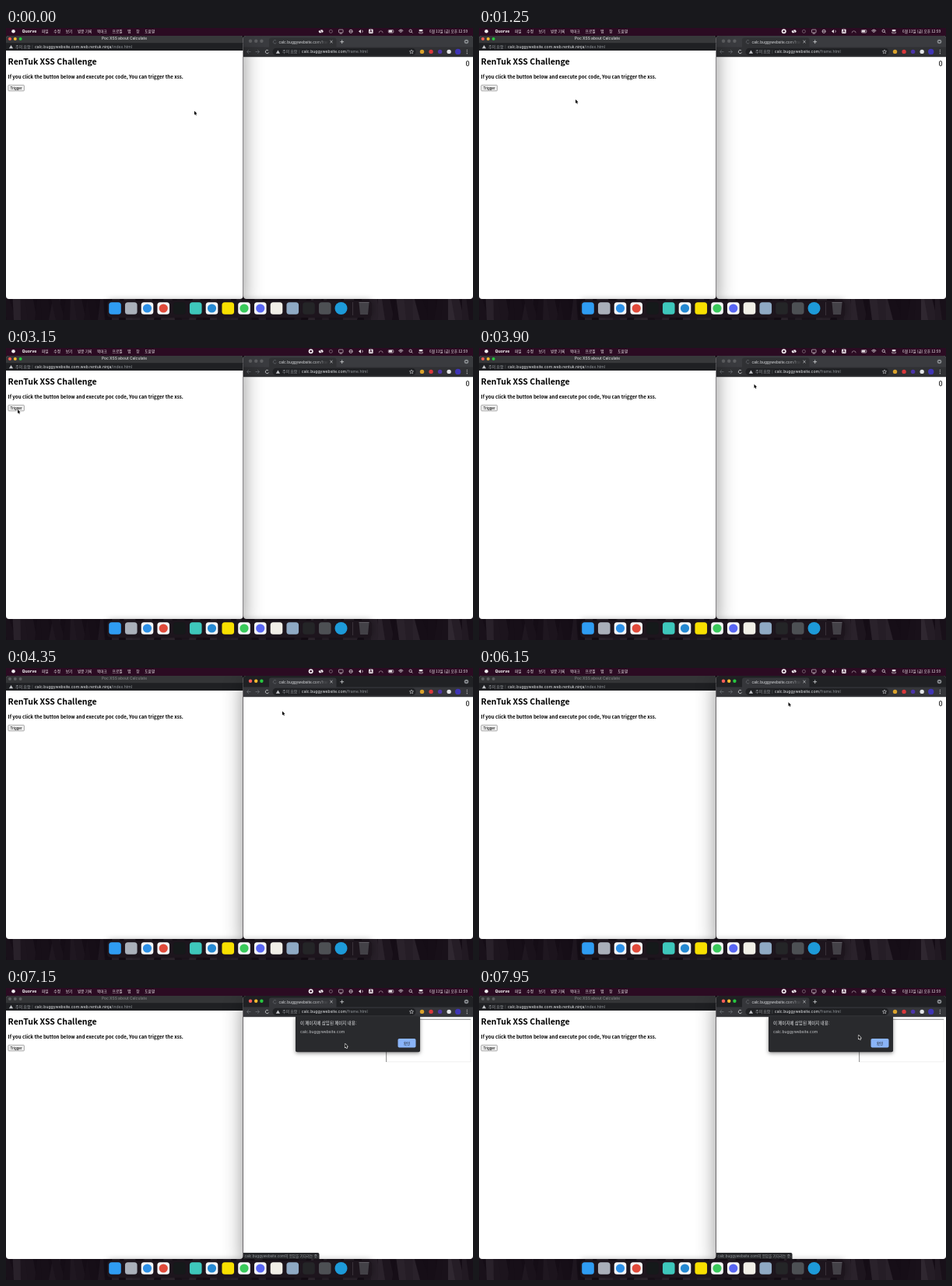
An HTML page with a canvas for the animation above (8000 ms loop, 600 px wide and 375 px high).

```html
<!DOCTYPE html>
<html lang="ko">
<head>
<meta charset="utf-8">
<title>XSS demo</title>
<style>
html, body { margin: 0; width: 100%; height: 100%; overflow: hidden; background: #120a12; }
canvas { display: block; width: 600px; height: 375px; }
</style>
</head>
<body>
<canvas id="stage" width="600" height="375"></canvas>
<script>
const LOOP = 8000, STEP = 50, TAU = Math.PI * 2;
const W = 600, H = 375, SPLIT = 304.5, TOP = 10, FLOOR = 348;
const CJK = '"Noto Sans CJK KR", "Noto Sans CJK JP", "Noto Sans CJK", sans-serif';
const UI = 'Inter, ' + CJK;
const PALE = '#eee7ec', GREY = '#d4d6d9', DIM = '#696c71', BAR = '#2b0b22';
const ctx = document.getElementById('stage').getContext('2d');

// Pointer moves after the first position
const HOME = { x: 242, y: 106.5 };
const MOVES = [
  { from: 600, to: 1350, x: 118, y: 91 },
  { from: 1500, to: 2300, x: 24, y: 75 },
  { from: 2350, to: 2850, x: 15, y: 79 },
  { from: 3350, to: 3900, x: 353.5, y: 46.5 },
  { from: 3900, to: 4200, x: 355, y: 55.5 },
  { from: 4600, to: 4950, x: 397.5, y: 44 },
  { from: 6900, to: 7150, x: 435.5, y: 71.5 },
  { from: 7150, to: 7750, x: 453, y: 69 },
  { from: 7750, to: 7950, x: 487.5, y: 60.5 }
];

function rect(x, y, w, h, fill) {
  ctx.fillStyle = fill;
  ctx.fillRect(x, y, w, h);
}

function box(x, y, w, h, r, fill, stroke) {
  ctx.beginPath();
  ctx.roundRect(x, y, w, h, r);
  if (fill) { ctx.fillStyle = fill; ctx.fill(); }
  if (stroke) { ctx.strokeStyle = stroke; ctx.lineWidth = 0.6; ctx.stroke(); }
}

function dot(x, y, r, fill) {
  ctx.beginPath();
  ctx.arc(x, y, r, 0, TAU);
  ctx.fillStyle = fill;
  ctx.fill();
}

function ring(x, y, r, color, from = 0, to = TAU, width = 0.7) {
  ctx.beginPath();
  ctx.arc(x, y, r, from, to);
  ctx.strokeStyle = color;
  ctx.lineWidth = width;
  ctx.stroke();
}

function line(color, width, ...p) {
  ctx.beginPath();
  for (let i = 0; i < p.length; i += 2) ctx.lineTo(p[i], p[i + 1]);
  ctx.strokeStyle = color;
  ctx.lineWidth = width;
  ctx.stroke();
}

function shape(fill, ...p) {
  ctx.beginPath();
  for (let i = 0; i < p.length; i += 2) ctx.lineTo(p[i], p[i + 1]);
  ctx.closePath();
  ctx.fillStyle = fill;
  ctx.fill();
}

// Returns the right end of the text
function text(s, x, y, size, fill, weight = 400, font = UI, align = 'left') {
  ctx.font = `${weight} ${size}px ${font}`;
  ctx.textAlign = align;
  ctx.fillStyle = fill;
  ctx.fillText(s, x, y);
  return x + ctx.measureText(s).width;
}

function fade(x0, y0, x1, y1, ...colors) {
  const g = ctx.createLinearGradient(x0, y0, x1, y1);
  colors.forEach((c, i) => g.addColorStop(i / (colors.length - 1), c));
  return g;
}

function at(x, y, paint) {
  ctx.save();
  ctx.translate(x, y);
  paint();
  ctx.restore();
}

function shadow(alpha, blur, dy, paint) {
  ctx.save();
  ctx.shadowColor = `rgba(0,0,0,${alpha})`;
  ctx.shadowBlur = blur;
  ctx.shadowOffsetY = dy;
  paint();
  ctx.restore();
}

function seeded(n) {
  return () => (n = (n * 16807) % 2147483647) / 2147483647;
}

function wallpaper() {
  rect(0, 0, W, H, '#150d16');
  const rnd = seeded(11);
  for (let x = -8; x < W; x += 9) {
    const tone = 14 + 26 * rnd() ** 2, lean = 16 * rnd() - 8;
    shape(`rgb(${tone + 8},${tone},${tone + 9})`,
      x, H, x + lean, FLOOR - 2, x + lean + 10, FLOOR - 2, x + 12, H);
  }
}

// Each glyph is painted around its own centre
const STATUS = [
  () => { dot(0, 0, 3, PALE); dot(0, 0, 1.2, BAR); },
  () => { dot(-1, 0.3, 1.8, PALE); dot(1, 0, 2, PALE); line(BAR, 0.8, -2, -2, 3, 3); },
  () => ring(0, 0, 2, '#8d7c88'),
  () => { box(-2.8, -2.2, 5.6, 3.8, 0.6, null, PALE); line(PALE, 0.7, -1.5, 2.8, 1.5, 2.8); },
  () => { ring(0, 0, 2.1, PALE); line(PALE, 0.6, -2, 0, 2, 0); },
  () => { shape(PALE, -3, 0, 0, -2.4, 0, 2.4); ring(0.3, 0, 2, PALE, -0.9, 0.9); },
  () => { box(-2.8, -2.8, 5.6, 5.6, 1, PALE); text('A', 0, 1.8, 4.8, BAR, 600, UI, 'center'); },
  () => ring(0, 2, 2.5, '#a898a3', TAU / 2, TAU),
  () => { box(-3.2, -1.8, 6.5, 3.6, 1, null, PALE); rect(-2.5, -1.2, 4.2, 2.4, PALE); },
  () => { for (let r = 1.2; r < 5; r += 1.5) ring(0, 2.2, r, PALE, -2.35, -0.8, 0.8); },
  () => { ring(-0.5, -0.5, 1.7, PALE); line(PALE, 0.7, 0.7, 0.7, 2.2, 2.2); },
  () => { box(-2.5, -2.3, 5, 1.9, 1, PALE); box(-2.5, 0.6, 5, 1.9, 1, null, PALE); }
];

function menuBar(t) {
  rect(0, 0, W, TOP, BAR);
  dot(9.5, 4.2, 2.3, '#f2eef1');
  text('Quorve', 20.5, 6, 5.2, '#fff', 700);
  let x = 46;
  for (const s of '파일,수정,보기,방문 기록,북마크,프로필,탭,창,도움말'.split(',')) {
    x = text(s, x, 6, 4.7, '#f3edf1', 500, CJK) + 6.7;
  }
  STATUS.forEach((paint, i) => {
    if (i || t >= 50) at(391.7 + i * 12.85, 4.3, paint);
  });
  text('6월 11일 (금) 오후 12:59', 544, 6, 4.75, '#f3edf1', 500, CJK);
}

function dock() {
  shadow(0.4, 9, 0, () => box(130, 350, 340, 22, 5, '#1d151d'));
  // Tile colour, then the colour of a round mark if any
  const icons = ['#2f9df3', '#aab0ba', '#f4f5f6 #2c8fe6', '#f4f5f6 #e04a3b', '#15191a', '#3ec7bb',
    '#f4f5f6 #2488d2', '#f9e000', '#f4f5f6 #39c95b', '#f4f5f6 #5865f2', '#f1eee7', '#8fa9c4', '#242527', '#4d5054',
    'none #1d9ad9'];
  icons.forEach((icon, i) => {
    const [tile, mark] = icon.split(' ');
    at(140 + i * 20.75, 360, () => {
      if (tile !== 'none') box(-7.8, -7.8, 15.6, 15.6, 3.6, tile);
      if (mark) dot(0, 0, tile === 'none' ? 8 : 5.6, mark);
    });
  });
  line('#4d454d', 0.6, 445.5, 352, 445.5, 369);
  shape('#434147', 453.5, 352.5, 466.5, 352.5, 465, 368, 455, 368);
  line('#77757b', 0.7, 453.5, 352.5, 466.5, 352.5);
}

// Clips to the desktop, lays down the shadow and the white page
function frame(x, w, on, paint) {
  ctx.save();
  ctx.beginPath();
  ctx.rect(0, TOP, W, FLOOR - TOP);
  ctx.clip();
  shadow(on ? 0.46 : 0.25, on ? 26 : 10, on ? 8 : 2, () => box(x, TOP, w, FLOOR - TOP, 4, '#fff'));
  paint();
  ctx.restore();
}

function lights(x, y, gap, r, on) {
  ['#fe5f57', '#febc2e', '#28c840'].forEach((c, i) => dot(x + i * gap, y, r, on ? c : '#5d5e61'));
}

function address(x, y, host, path) {
  shape('#c3c5c9', x, y - 4, x + 2.6, y + 0.3, x - 2.6, y + 0.3);
  text('주의 요함', x + 5.5, y, 5, '#9da1a6', 400, CJK);
  line('#5d6064', 0.6, x + 27.4, y - 4.2, x + 27.4, y + 0.5);
  const end = text(host, x + 30.4, y, 5.1, '#e8eaed');
  text(path, end, y, 5.1, '#92969b');
}

function popup(on, pressed) {
  frame(0, SPLIT, on, () => {
    box(0, TOP, SPLIT, 10, [3, 3, 0, 0], on ? '#37383a' : '#343537');
    rect(0, 19.2, SPLIT, 9.8, '#1f2023');
    lights(5, 14, 6.8, 2, on);
    text('Poc XSS about Calculate', 152, 15.4, 4.9, on ? '#c4c5c7' : '#77787b', 600, UI, 'center');
    address(6.5, 25.9, 'calc.buggywebsite.com.web.rentuk.ninja', '/index.html');
    text('RenTuk XSS Challenge', 2.6, 46.8, 10.5, '#000', 700, CJK);
    text('If you click the button below and execute poc code, You can trigger the xss.', 2.6, 64.6, 6.17, '#000', 700, CJK);
    box(2.8, 73.3, 20.6, 7.5, 1, pressed ? '#d2d2d2' : '#efefef', '#767676');
    text('Trigger', 13.1, 78.7, 4.8, '#000', 400, '"Liberation Sans", sans-serif', 'center');
  });
}

function tabStrip(on) {
  const base = on ? '#35363a' : '#303134';
  box(305, TOP, 295, 27, [3, 3, 0, 0], on ? '#202124' : '#3a3b3f');
  rect(305, 24.5, 295, 12.7, base);
  box(338, 12.5, 86.5, 12.5, [3, 3, 0, 0], base);
  lights(314, 16.8, 7.2, 2.2, on);
  ring(345.5, 17.8, 2.2, DIM, 0.5, 5.5);
  text('calc.buggywebsite.com/frame', 350.5, 19.5, 4.75, fade(396, 0, 414, 0, '#dee0e3', '#dee0e300'));
  at(418, 17.6, () => {
    line(GREY, 0.7, -1.6, -1.6, 1.6, 1.6);
    line(GREY, 0.7, -1.6, 1.6, 1.6, -1.6);
  });
  at(431.7, 17.7, () => {
    line(GREY, 0.8, -2.4, 0, 2.4, 0);
    line(GREY, 0.8, 0, -2.4, 0, 2.4);
  });
  dot(591.5, 17.5, 2.8, '#85888c');
  shape('#202124', 590, 16.9, 593, 16.9, 591.5, 18.6);
}

function arrow(x, dir) {
  at(x, 30.5, () => {
    line(DIM, 0.8, -2.5 * dir, 0, 2.5 * dir, 0);
    line(DIM, 0.8, 0.2 * dir, -2.3, 2.5 * dir, 0, 0.2 * dir, 2.3);
  });
}

function star(x, y, r) {
  const p = Array.from({ length: 22 }, (_, i) => {
    const k = i >> 1, a = k * TAU / 10 - TAU / 4, d = k % 2 ? r * 0.45 : r;
    return i % 2 ? y + d * Math.sin(a) : x + d * Math.cos(a);
  });
  line(GREY, 0.6, ...p);
}

function toolbar() {
  arrow(312, -1);
  arrow(323, 1);
  ring(335.5, 30.5, 2.2, GREY, 0.4, 5.5, 0.8);
  box(342.5, 25.8, 184, 9.4, 4.7, '#202124');
  address(349.4, 32.4, 'calc.buggywebsite.com', '/frame.html');
  star(521, 30.6, 2.7);
  ['#d9a22c', '#d9383b', '#4b34a8', '#e2e4e7', '#3f35b5'].forEach((c, i) => {
    dot(534.5 + i * 11.55, 30.4, i === 4 ? 3.7 : 2.7, c);
  });
  for (let y = 28.3; y < 33; y += 2.2) dot(592.3, y, 0.6, GREY);
}

function dialog(alpha) {
  ctx.save();
  ctx.globalAlpha = alpha;
  shadow(0.45, 5, 1.5, () => box(372, 36.8, 160, 45.5, [0, 0, 2, 2], '#292a2d'));
  text('이 페이지에 삽입된 페이지 내용:', 378, 47.2, 5.5, '#e8eaed', 400, CJK);
  text('calc.buggywebsite.com', 378, 57.7, 5.1, '#c6c8cb');
  box(503.5, 65, 23, 11.5, 1.8, '#8ab4f8');
  text('확인', 515, 72.5, 4.7, '#202124', 500, CJK, 'center');
  box(305, 340, 97.5, 8.2, [0, 2, 0, 0], '#292a2d');
  text('calc.buggywebsite.com의 응답을 기다리는 중...', 306.5, 345.9, 4.6, '#9fa3a8');
  ctx.restore();
}

function browser(on, t) {
  frame(305, 295, on, () => {
    tabStrip(on);
    toolbar();
    if (t < 6200) {
      text('0', 595.5, 48.5, 9.2, '#000', 500, CJK, 'right');
    } else {
      line('#e4e4e4', 0.6, 597, 40.5, 597, 94.8, 488.5, 94.8);
      line('#6d6d6d', 0.8, 488.6, 95, 488.6, 40.3, 597.2, 40.3);
    }
    if (t >= 6350) dialog(Math.min(1, (t - 6300) / 250));
  });
}

function pointer(t) {
  let { x, y } = HOME;
  for (const m of MOVES) {
    const k = Math.min(1, Math.max(0, (t - m.from) / (m.to - m.from)));
    const ease = k * k * (3 - 2 * k);
    x += (m.x - x) * ease;
    y += (m.y - y) * ease;
  }
  at(x, y, () => {
    const p = [0, 0, 0, 5, 1.1, 4, 2, 5.8, 2.8, 5.4, 2, 3.7, 3.5, 3.6];
    ctx.lineJoin = 'round';
    line('#fff', 1.1, ...p, 0, 0);
    shape('#000', ...p);
  });
}

function draw(t) {
  wallpaper();
  if (t >= 4200) {
    popup(false, false);
    browser(true, t);
  } else {
    browser(false, t);
    popup(true, t >= 3000 && t < 3150);
  }
  menuBar(t);
  dock();
  pointer(t);
}

const start = performance.now();
function tick() {
  const t = (performance.now() - start) % LOOP;
  draw(Math.floor(t / STEP) * STEP);
  requestAnimationFrame(tick);
}
tick();
</script>
</body>
</html>
```
